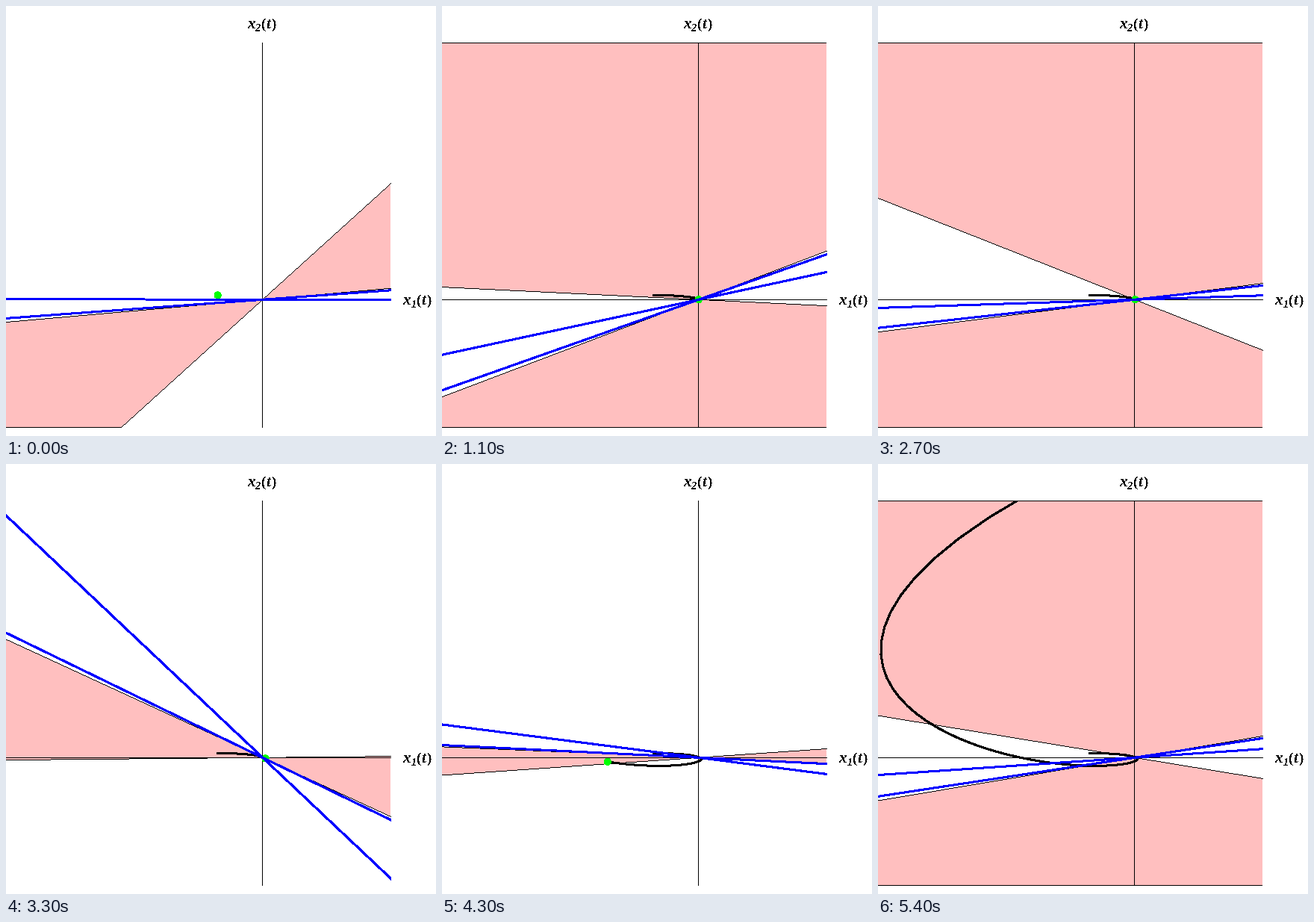
A matplotlib script that plays this animation: 576x576 px, repeating every 5.5 s.

```python
import numpy as np
import matplotlib.pyplot as plt
from matplotlib.animation import FuncAnimation
from matplotlib.colors import ListedColormap
from matplotlib.patches import Circle, Rectangle

SIZE, FRAMES, INTERVAL = 576, 55, 100
TOP, SPAN = 49, 516                    # plot box: x 0..516, y 49..565
CX, CY = 343.8, 393.3                  # origin of the phase plane
SQUASH = 0.3                           # vertical scale against horizontal
A0 = np.array([[-10.0, 36.0], [0.0, -1.0]])   # eigenvalues -10 and -1
RATE = 6.3                             # rotation rate of the system matrix
TURN = 4 * np.pi / FRAMES              # rotation per frame
START = -0.0063
DT = TURN / RATE
DECAY, GROWTH = 19.9 * DT, 8.9 * DT    # modes in the rotating frame
WHITE, PINK, BLACK = range(3)


def phase(n):
    return START - TURN * n


def matrix(n):
    c, s = np.cos(phase(n)), np.sin(phase(n))
    rot = np.array([[c, -s], [s, c]])
    return rot @ A0 @ rot.T


def growth_form(n):
    """Coefficients of x^2, xy, y^2 in the rate of change of x^2 + 9 y^2."""
    a = matrix(n)
    return a[0, 0], a[0, 1] + 9 * a[1, 0], 9 * a[1, 1]


def to_px(x, y):
    return CX + x, CY - SQUASH * y


def line_px(angle):
    """A long line through the origin at the given plane angle."""
    d = np.array([np.cos(angle), SQUASH * np.sin(angle)])
    d *= 900 / np.hypot(*d)
    return [CX - d[0], CX + d[0]], [CY + d[1], CY - d[1]]


def state(n):
    n = np.asarray(n, float)
    fade = 63.5 * np.exp(-DECAY * n)
    rise = 856 * np.exp(GROWTH * (n - 49))
    a = np.arctan2(1, -3) - TURN * n
    b = np.radians(110.1) - TURN * (n - 49)
    return to_px(fade * np.cos(a) + rise * np.cos(b),
                 fade * np.sin(a) + rise * np.sin(b))


cols = np.arange(SPAN) + 0.5 - CX
rows = (CY - (np.arange(SPAN) + TOP + 0.5)) / SQUASH
gx, gy = np.meshgrid(cols, rows)


def paint_region(n):
    """Growth region with its hairline outline and the axes."""
    p, q, r = growth_form(n)
    img = np.where(p * gx**2 + q * gx * gy + r * gy**2 > 0, PINK, WHITE)
    img[[0, -1]] *= BLACK              # outline at top and bottom
    img[:, -1] = WHITE
    for slope in np.roots([r, q, p]).real:
        gap = SQUASH * abs(gy - slope * gx)
        img[gap <= 0.5 * max(1, SQUASH * abs(slope))] = BLACK
    img[int(CY) - TOP] = BLACK
    img[:, int(CX)] = BLACK
    return img


fig = plt.figure(figsize=(8, 8), dpi=72, facecolor="white")
ax = fig.add_axes([0, 0, 1, 1])
ax.set_axis_off()
region = ax.imshow(paint_region(0), vmin=WHITE, vmax=BLACK,
                   cmap=ListedColormap(["white", "#ffbfbf", "black"]),
                   extent=(0, SPAN, TOP + SPAN, TOP),
                   interpolation="nearest", aspect="auto", zorder=1)
ax.set_xlim(0, SIZE)
ax.set_ylim(SIZE, 0)
box = Rectangle((0, TOP), SPAN, SPAN, transform=ax.transData)


def add_line(color, z):
    # without antialiasing each touched pixel is filled: about 3 px wide
    line, = ax.plot([], [], color=color, lw=2, zorder=z, antialiased=False,
                    solid_capstyle="projecting", solid_joinstyle="round")
    line.set_clip_path(box)
    return line


def add_label(x, base, index):
    for dx, dy, text, size, style in ((0, 0, "x", 21, "italic"),
                                      (10.5, 4, index, 14, "italic"),
                                      (18, 0, "(", 19, "normal"),
                                      (25, 0, "t", 21, "italic"),
                                      (32.5, 0, ")", 19, "normal")):
        ax.text(x + dx, base + dy, text, fontsize=size, va="baseline",
                family="Liberation Serif", style=style, weight="bold",
                antialiased=False)


trail = add_line("black", 2)
dot = Circle((0, 0), 4.5, color="#00ff00", lw=0, zorder=3, antialiased=False)
ax.add_patch(dot)
dot.set_clip_path(box)
eigen = [add_line("blue", 4) for _ in range(2)]
add_label(324, 30, "2")
add_label(532, 400, "1")


def draw(n):
    region.set_data(paint_region(n))
    for line, lean in zip(eigen, (0, np.arctan(0.25))):
        line.set_data(*line_px(phase(n) + lean))
    trail.set_data(*state(np.arange(4 * n + 1) / 4))
    dot.center = state(n)
    return [region, trail, dot, *eigen]


anim = FuncAnimation(fig, draw, frames=FRAMES, interval=INTERVAL,
                     init_func=lambda: draw(0), repeat=True, repeat_delay=0)
plt.show()
```
